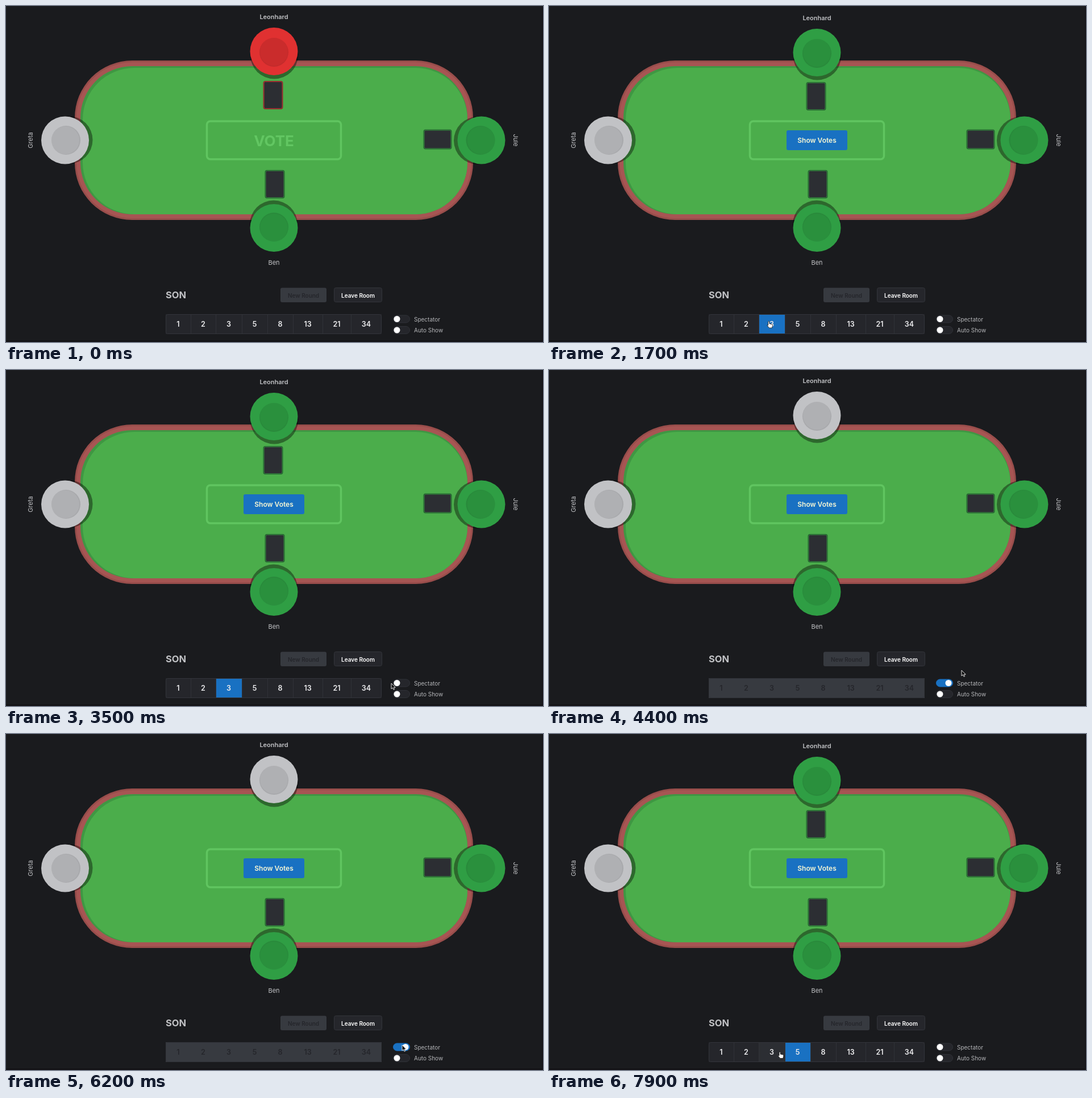
An HTML page for the animation above (8 s loop, 945 by 592 pixels).

```html
<!DOCTYPE html>
<html lang="en">
<head>
<meta charset="utf-8">
<title>Planning table</title>
<style>
  html, body { margin: 0; width: 100%; height: 100%; overflow: hidden; background: #1a1b1e; }
  svg { display: block; width: 945px; height: 592px; }
  text {
    font: 11px Inter, "Open Sans", sans-serif;
    fill: #c1c2c5; text-anchor: middle; dominant-baseline: central;
  }
  .bold { font-weight: 600; }
  .label { font-size: 10px; text-anchor: start; fill: #b4b5b8; }
  .button { font-size: 10px; font-weight: 600; }

  .seat { --chip: #2f9e44; --edge: #22602f; --line: #37843f; }
  .away { --chip: #c1c2c5; }
  .chip { fill: var(--chip); }
  .edge { fill: var(--edge); }
  .line { fill: #2c2e33; stroke: var(--line); }

  .cell { fill: #25262b; }
  .cell.hover { fill: #2c2e33; }
  .cell.picked { fill: #1971c2; }
  .digit { font-size: 12.5px; font-weight: 600; fill: #ececee; }
  .track { fill: #25262b; stroke: #303238; }

  [data-state=open] .own { --chip: #e03131; --edge: #8f2c2c; --line: #a33232; }
  [data-state=open] .show, [data-state=voted] .vote, [data-state=watching] .vote { display: none; }
  [data-state=voted] .shift { transform: translateY(2px); }
  [data-state=watching] .own { --chip: #c1c2c5; }
  [data-state=watching] .own .card { display: none; }
  [data-state=watching] .cell { fill: #373a40; }
  [data-state=watching] .digit { fill: #25262b; }
  [data-state=watching] .divider { display: none; }
  [data-state=watching] .spectator .track { fill: #1971c2; stroke: #1971c2; }
  [data-state=watching] .spectator .knob { transform: translateX(15px); }
</style>
</head>
<body>
<svg id="stage" viewBox="0 0 945 592" data-state="open">
  <defs>
    <!-- seen from the top seat, table below -->
    <g id="chip">
      <circle cx=".5" cy="6.5" r="42" fill="#000" fill-opacity=".4"/>
      <circle class="chip" r="42"/>
      <circle cy="1.5" r="25.5" fill="#000" fill-opacity=".13"/>
      <circle cy=".5" r="24.5" class="chip" fill-opacity=".25"/>
    </g>
    <g id="card">
      <rect class="edge" x="-19" y="52" width="35" height="50" rx="4"/>
      <rect class="line" x="-17.5" y="53.5" width="32" height="47" rx="2.5"/>
    </g>
  </defs>

  <rect width="945" height="592" fill="#1a1b1e"/>
  <path d="M0 590.5H945M944.5 0V592" stroke="#111014" stroke-width="2"/>

  <rect x="121" y="96" width="701" height="281" rx="101" fill="#984d4b"/>
  <rect x="124" y="99" width="695" height="275" rx="98" fill="#a75553"/>
  <rect x="131" y="106" width="681" height="261" rx="91" fill="#3f9743"/>
  <path d="M226 109H721A91 91 0 0 1 812 200V276A91 91 0 0 1 721 367H226A91 91 0 0 1 135 276V200A91 91 0 0 1 226 109Z" fill="#4bad4b"/>

  <rect x="353.5" y="203" width="236" height="67" rx="6" fill="none" stroke="#60c560" stroke-width="3.5"/>
  <text class="vote" x="471.5" y="237" style="font-size:26px;font-weight:700;fill:#62c662">VOTE</text>
  <g class="show">
    <rect x="418" y="219" width="107" height="35" rx="3" fill="#1971c2"/>
    <text class="bold" x="471.5" y="236.5" style="font-size:12px;fill:#f8f8d4">Show Votes</text>
  </g>

  <g class="shift">
    <g class="seat own" transform="translate(471.5 80)"><use href="#chip"/><use class="card" href="#card"/></g>
    <text class="bold" x="471.5" y="18.5">Leonhard</text>
  </g>
  <g class="seat" transform="translate(471.5 391) rotate(180)"><use href="#chip"/><use href="#card"/></g>
  <g class="seat" transform="translate(836.5 236.5) rotate(90)"><use href="#chip"/><use href="#card"/></g>
  <g class="seat away" transform="translate(104 236.5) rotate(-90)"><use href="#chip"/></g>
  <text x="471.5" y="452">Ben</text>
  <text transform="translate(43 236.5) rotate(-90)">Greta</text>
  <text transform="translate(897 236.5) rotate(90)">Jule</text>

  <text x="281" y="509" style="font-size:16.5px;font-weight:700;text-anchor:start">SON</text>
  <rect x="483" y="496.5" width="81" height="25.5" rx="3" fill="#373a40"/>
  <text class="button" x="523.5" y="509.5" style="fill:#25262b">New Round</text>
  <rect x="577.5" y="496.5" width="84" height="25" rx="3" fill="#25262b" stroke="#33353b"/>
  <text class="button" x="619.5" y="509.5" style="fill:#fff">Leave Room</text>

  <g id="row"></g>
  <rect x="281.5" y="543.5" width="379" height="34" rx="3" fill="none" stroke="#33353b"/>

  <g class="spectator" transform="translate(0 551.5)">
    <rect class="track" x="681.5" y="-6.5" width="29" height="13" rx="6.5"/>
    <circle class="knob" cx="688" r="5.5" fill="#fff"/>
    <text class="label" x="718">Spectator</text>
  </g>
  <g transform="translate(0 571)">
    <rect class="track" x="681.5" y="-6.5" width="29" height="13" rx="6.5"/>
    <circle cx="688" r="5.5" fill="#fff"/>
    <text class="label" x="718">Auto Show</text>
  </g>

  <g id="cursor">
    <path id="arrow" d="M0 0V10L2.4 7.8 4 11.3 5.7 10.6 4.2 7.3H7.2Z" fill="#111" stroke="#dcdcdc"/>
    <path id="hand" d="M-3-5a1.1 1.1 0 0 1 2.2 0V-2L3.6-1q1.6.5 1.2 2.4L3.8 5.5H-1.2L-4.8 1.2q-.4-1.6 1.8-.4Z" fill="#fff" stroke="#111" stroke-width=".8"/>
  </g>
</svg>
<script>
  const LOOP = 8000, STEP = 100;
  const $ = id => document.getElementById(id);
  const stage = $('stage'), cursor = $('cursor');

  const values = [1, 2, 3, 5, 8, 13, 21, 34];
  const edges = [281, 325, 369, 415, 460, 505, 557, 607, 661];

  // [start, state, picked value]
  const states = [
    [0, 'open'], [1600, 'voted', 3], [3900, 'watching'],
    [6300, 'open'], [7200, 'voted', 5]
  ];

  // [time, x, y]
  const path = [
    [0, 727, 170], [100, 720, 178], [500, 572, 322], [700, 512, 365], [900, 459, 394],
    [1000, 440, 440], [1200, 401, 526], [1300, 393, 550], [1500, 390, 561], [1800, 388, 562],
    [2100, 372, 563], [2300, 400, 562], [2500, 438, 560], [2700, 452, 561], [2900, 490, 562],
    [3300, 640, 558], [3600, 697, 549], [4000, 697, 549], [4200, 712, 543], [4400, 726, 529],
    [4600, 726, 522], [4900, 722, 511], [5400, 726, 521], [5700, 718, 532], [6000, 699, 547],
    [6200, 697, 548], [6400, 690, 550], [6600, 640, 557], [6900, 495, 565], [7100, 453, 566],
    [7400, 448, 566], [7700, 420, 566], [7900, 408, 566]
  ];

  $('row').innerHTML = values.map((v, i) => {
    const x = edges[i], w = edges[i + 1] - x;
    const divider = i ? `<path class="divider" d="M${x}.5 544V577" stroke="#303238"/>` : '';
    return `<rect class="cell" x="${x}" y="543" width="${w}" height="35"/>${divider}
      <text class="digit" x="${x + w / 2}" y="560.5">${v}</text>`;
  }).join('');
  const cells = [...document.querySelectorAll('.cell')];

  function position(t) {
    const i = path.findIndex(p => p[0] > t);
    if (i < 0) return path[path.length - 1].slice(1);
    const [t0, x0, y0] = path[i - 1], [t1, x1, y1] = path[i];
    const k = (t - t0) / (t1 - t0);
    return [x0 + (x1 - x0) * k, y0 + (y1 - y0) * k];
  }

  function draw(now) {
    const t = Math.floor(now % LOOP / STEP) * STEP;
    const [, state, picked] = states.filter(s => s[0] <= t).pop();
    const [x, y] = position(t);
    const over = state !== 'watching' && y >= 543 && y <= 578;

    stage.dataset.state = state;
    let hovering = false;
    cells.forEach((cell, i) => {
      const hover = over && x >= edges[i] && x < edges[i + 1];
      hovering = hovering || hover;
      cell.classList.toggle('hover', hover);
      cell.classList.toggle('picked', values[i] === picked);
    });

    cursor.style.display = t < STEP ? 'none' : '';
    cursor.setAttribute('transform', `translate(${x} ${y})`);
    $('hand').style.display = hovering ? '' : 'none';
    $('arrow').style.display = hovering ? 'none' : '';
    requestAnimationFrame(draw);
  }
  draw(performance.now());
</script>
</body>
</html>
```
